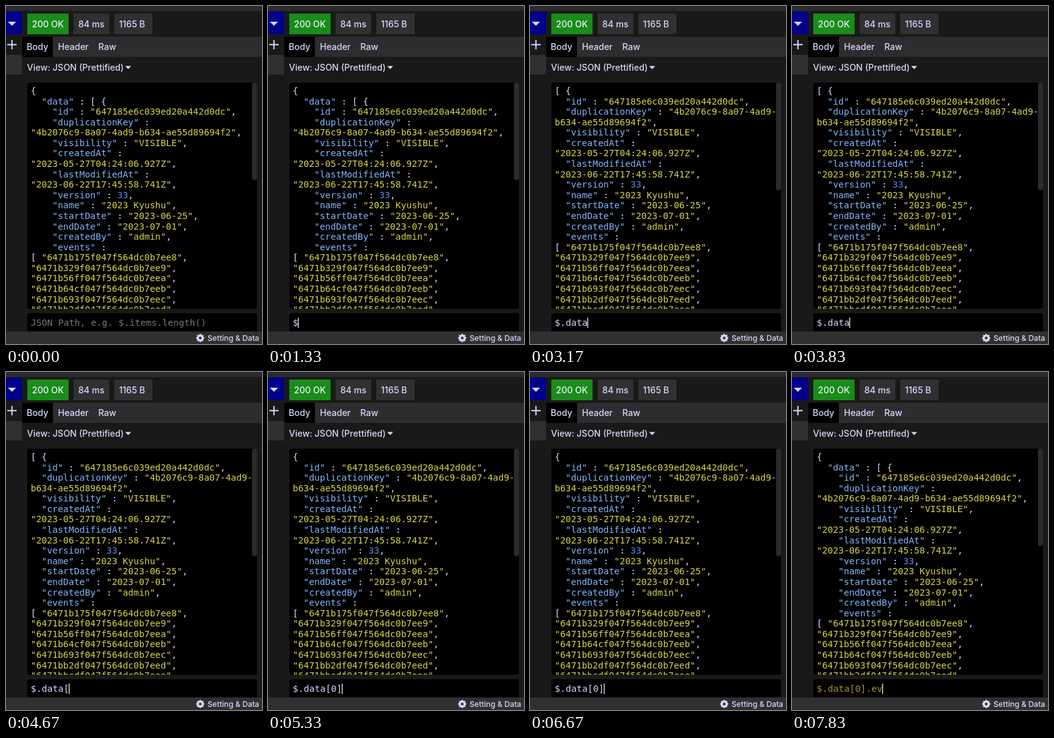
Recreate the animation shown at these times as an HTML page. Size 409 by 538 pixels, loop 8 s.

```html
<!DOCTYPE html>
<html lang="en">
<head>
<meta charset="utf-8">
<title>JSON path filter</title>
<style>
  html, body { margin: 0; width: 100%; height: 100%; overflow: hidden; background: #191919; }
  svg { display: block; width: 100vw; height: 100vh; }
  text { white-space: pre; }
  .ui { font: 500 14px Inter, "Open Sans", sans-serif; fill: #d8d8ff; }
  .code { font: 14.36px "DejaVu Sans Mono", "Noto Sans Mono", monospace; fill: #d8d8ff; }
  .key { fill: #86b6fa; }
  .str { fill: #d6d64a; }
  .num { fill: #6488ee; }
  #field { font-size: 14.55px; }
</style>
</head>
<body>
<svg viewBox="0 0 409 538" preserveAspectRatio="none">
  <defs>
    <clipPath id="pane"><rect x="34" y="122" width="367" height="360" rx="4"/></clipPath>
  </defs>
  <rect width="409" height="538" fill="#191919"/>
  <rect width="409" height="8" fill="#2b2b2d"/>

  <!-- left column -->
  <rect y="9" width="25.5" height="36" fill="#00008b"/>
  <path d="M3 25H16L9.5 31.5Z" fill="#d8d8ff"/>
  <path d="M2 61.5H17M9.5 54V69" stroke="#d8d8ff" stroke-width="2"/>
  <rect y="78" width="25.5" height="31" fill="#303032"/>

  <!-- response summary -->
  <rect x="34" y="12" width="66" height="33" fill="#1a8c1a"/>
  <rect x="108" y="12" width="57" height="33" fill="#303032"/>
  <rect x="173" y="12" width="61" height="33" fill="#303032"/>
  <g class="ui">
    <text x="41.5" y="33.5" fill="#eeeeff">200 OK</text>
    <text x="115.5" y="33.5">84 ms</text>
    <text x="180.5" y="33.5">1165 B</text>
  </g>

  <!-- tabs -->
  <rect x="26" y="49" width="383" height="32" fill="#2d2d2f"/>
  <rect x="26" y="49" width="49" height="32" fill="#000"/>
  <g class="ui">
    <text x="33" y="70">Body</text>
    <text x="83" y="70">Header</text>
    <text x="147.5" y="70">Raw</text>
  </g>
  <text class="ui" x="33.5" y="102.5">View: JSON (Prettified)</text>
  <path d="M190.5 95.5H200L195.2 100.5Z" fill="#d8d8ff"/>

  <!-- result and path field -->
  <rect x="34" y="122" width="367" height="360" rx="4" fill="#000"/>
  <g id="views" class="code" clip-path="url(#pane)"></g>
  <rect id="bar" x="393" y="122" width="8" height="155" rx="4" fill="#2b2b2a"/>
  <rect x="34" y="489" width="367" height="34" rx="4" fill="#000"/>
  <text id="field" class="code" x="39.5" y="509"></text>
  <rect id="caret" y="496" width="1.3" height="16.5" fill="#f0f0ff"/>

  <!-- status bar -->
  <rect y="518" width="409" height="20" fill="#303032"/>
  <circle cx="310.3" cy="528.4" r="3.8" fill="none" stroke="#d8d8ff" stroke-width="3.2"/>
  <g id="gear" stroke="#d8d8ff" stroke-width="2.6"></g>
  <text class="ui" x="322" y="532.7" style="font-size:12.2px">Setting &amp; Data</text>
</svg>
<script>
const LOOP = 8000, LEFT = 39.5, CHAR = 8.645, FIELD_CHAR = 8.76;
const TOP = 140, LINE = 16.58, BLINK = 500;
const NS = "http://www.w3.org/2000/svg";
const $ = id => document.getElementById(id);

function add(parent, tag, attrs, text = "") {
  const el = document.createElementNS(NS, tag);
  for (const k in attrs) el.setAttribute(k, attrs[k]);
  el.textContent = text;
  return parent.appendChild(el);
}

// Line breaks are where the pane wraps, also inside strings.
const record = (pad, id) => [
  '"id" : "647185e6c039ed20a442d0dc",', id,
  '"visibility" : "VISIBLE",',
  '"createdAt" :\n"2023-05-27T04:24:06.927Z",',
  '"lastModifiedAt" :\n"2023-06-22T17:45:58.741Z",',
  '"version" : 33,', '"name" : "2023 Kyushu",',
  '"startDate" : "2023-06-25",', '"endDate" : "2023-07-01",',
  '"createdBy" : "admin",', '"events" :'
].map(s => pad + s).join("\n") + "\n[ " +
  ["175f|8", "329f|9", "56ff|a", "64cf|b", "693f|c", "b2df|d", "bcdf|e"]
    .map(s => '"6471b' + s.replace("|", "047f564dc0b7ee") + '"').join(",\n");

const wide = record("    ", '"duplicationKey" :\n"4b2076c9-8a07-4ad9-b634-ae55d89694f2",');
const narrow = record("  ", '"duplicationKey" : "4b2076c9-8a07-4ad9-\nb634-ae55d89694f2",');

function buildView(source) {
  const g = add($("views"), "g", {});
  let row = 0, col = 0;
  for (const [token] of source.matchAll(/"[^"]*"(?: :)?|\d+|[^"\d]+/g)) {
    const isKey = token.endsWith('" :');
    const parts = isKey ? [[token.slice(0, -2), "key"], [" :", ""]]
      : [[token, token[0] === '"' ? "str" : /\d/.test(token) ? "num" : ""]];
    for (const [part, cls] of parts) {
      part.split("\n").forEach((piece, i) => {
        if (i) { row++; col = 0; }
        if (piece.trim()) {
          add(g, "text", { x: LEFT + col * CHAR, y: TOP + row * LINE, class: cls }, piece);
        }
        col += piece.length;
      });
    }
  }
  return g;
}

const views = {
  root: { el: buildView('{\n  "data" : [ {\n' + wide), bar: 155 },
  list: { el: buildView("[ {\n" + narrow), bar: 171 },
  item: { el: buildView("{\n" + narrow), bar: 171 }
};

for (let i = 0; i < 8; i++) {
  add($("gear"), "path", { d: "M310.3 521.9V524.4", transform: `rotate(${i * 45} 310.3 528.4)` });
}

// time, typed path, visible result, path matches
const steps = [
  [0, "", "root", true],
  [1170, "$", "root", true],
  [1830, "$.", "root", false],
  [2170, "$.d", "root", false],
  [2330, "$.da", "root", false],
  [2500, "$.dat", "root", false],
  [2750, "$.data", "list", true],
  [4450, "$.data[", "list", true],
  [4900, "$.data[0", "root", false],
  [5250, "$.data[0]", "item", true],
  [7250, "$.data[0].", "root", false],
  [7500, "$.data[0].e", "root", false],
  [7750, "$.data[0].ev", "root", false]
];

function draw(t) {
  const [start, typed, view, ok] = steps.findLast(s => s[0] <= t);
  for (const name in views) views[name].el.style.display = name === view ? "" : "none";
  $("bar").setAttribute("height", views[view].bar);
  const field = $("field"), caret = $("caret");
  field.textContent = typed || "JSON Path, e.g. $.items.length()";
  field.style.fill = !typed ? "#777" : ok ? "#d8d8ff" : "#a89a10";
  caret.setAttribute("x", LEFT + typed.length * FIELD_CHAR - 0.5);
  const lit = typed && Math.floor((t - start) / BLINK) % 2 === 0;
  caret.style.display = lit ? "" : "none";
}

const origin = performance.now();
function tick() {
  draw((performance.now() - origin) % LOOP);
  requestAnimationFrame(tick);
}
tick();
</script>
</body>
</html>
```
